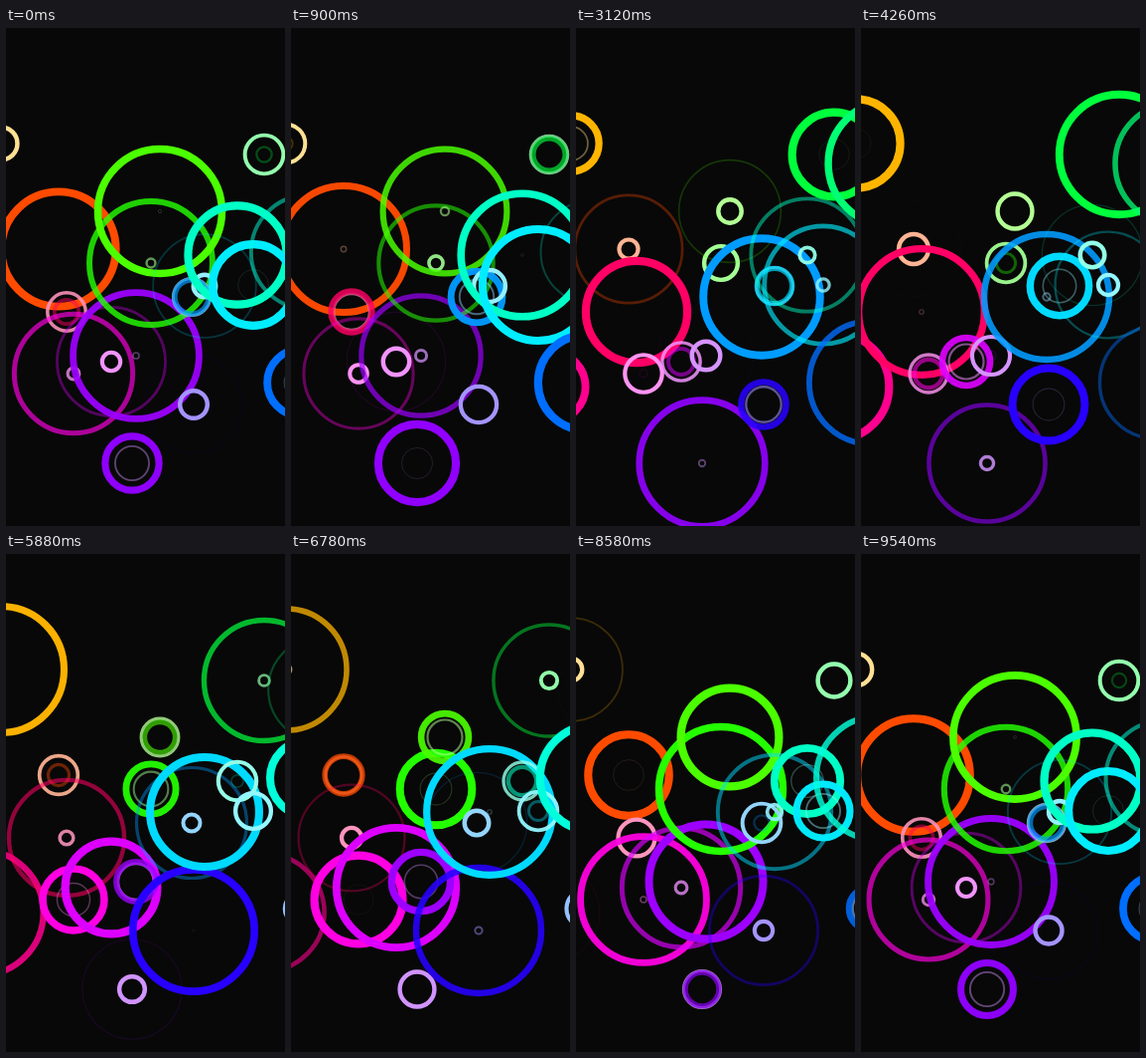
Recreate the animation shown at these times as an HTML page. Size 281 by 500 pixels, loop 9600 ms.

```html
<!DOCTYPE html>
<html lang="en">
<head>
<meta charset="utf-8">
<title>Pulsing rings</title>
<style>
  html, body { margin: 0; width: 100%; height: 100%; overflow: hidden; background: #080808; }
  svg { display: block; width: 100%; height: 100%; }
</style>
</head>
<body>
<svg id="stage" viewBox="0 0 281 500" fill="none"></svg>
<script>
const LOOP = 9600, TICK = 60;
const LEAD = 1 / 16; // part of the loop a ring has lived at time 0
const CENTER = { x: 140.5, y: 250 };

// Ring centres in order of phase, spread evenly over the loop
const SPOTS = [
  [155, 184], [131, 329], [146, 236], [68, 347], [304, 225],
  [106, 335], [200, 259], [189, 378], [-5, 116], [-25, 360],
  [260, 127], [61, 285], [187, 270], [317, 136], [127, 437],
  [296.5, 356], [249, 258], [233, 228], [53, 222]
];

const stage = document.getElementById('stage');

function addRing(x, y, color) {
  const el = document.createElementNS('http://www.w3.org/2000/svg', 'circle');
  el.setAttribute('cx', x);
  el.setAttribute('cy', y);
  el.setAttribute('stroke', color);
  stage.appendChild(el);
  return el;
}

// The colour wheel turns around the stage centre
const hueAt = (x, y) => 180 + Math.atan2(y - CENTER.y, x - CENTER.x) * 180 / Math.PI;

// Each spot has a small pale ring and a big vivid one, half a loop apart
const rings = SPOTS
  .map(([x, y], i) => ({ x, y, shift: i / SPOTS.length + LEAD }))
  .sort((a, b) => a.x - b.x)
  .flatMap(({ x, y, shift }) => {
    const hue = hueAt(x, y);
    return [
      { el: addRing(x, y, `hsl(${hue},100%,79%)`), shift, size: 19.4, line: 4.5 },
      { el: addRing(x, y, `hsl(${hue},100%,50%)`), shift: shift + .5, size: 63.5, line: 8.2 }
    ];
  });

// Slow growth, a quick swell halfway, then a gentle shrink
function swell(p) {
  const turn = .85 * p + .65 / (1 + Math.exp(-14 * (p - .525)));
  return Math.sin(Math.PI / 2 * turn);
}

function draw(time) {
  for (const { el, shift, size, line } of rings) {
    const p = (time / LOOP + shift) % 1;
    const glow = Math.sin(Math.PI * p ** .85);
    el.setAttribute('r', size * swell(p));
    el.setAttribute('stroke-width', line * glow ** 1.35);
    el.setAttribute('stroke-opacity', Math.min(1, 1.15 * glow ** 1.5));
  }
}

function frame() {
  draw(Math.floor(performance.now() / TICK) * TICK % LOOP);
  requestAnimationFrame(frame);
}
draw(0);
requestAnimationFrame(frame);
</script>
</body>
</html>
```
